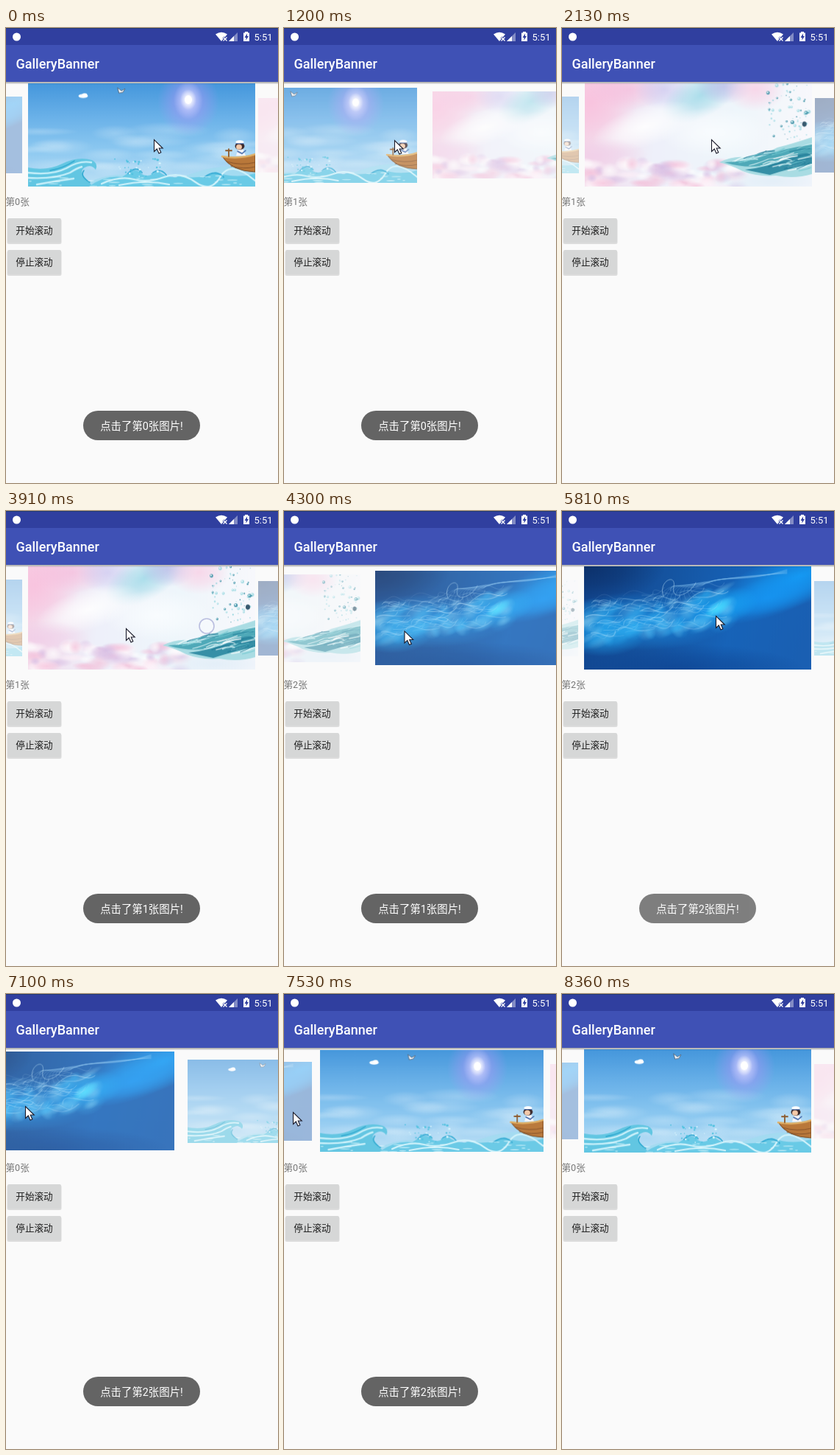
An HTML page with a canvas that plays this animation: 370x617 px, repeating every 8.46 s.

```html
<!DOCTYPE html>
<html lang="zh-CN">
<head>
<meta charset="utf-8">
<title>GalleryBanner</title>
<style>
html, body { margin: 0; width: 370px; height: 617px; overflow: hidden; background: #fafafa; }
canvas, svg { position: absolute; left: 0; top: 0; display: block; }
text { font-family: Roboto, "Noto Sans CJK SC", "Noto Sans CJK", sans-serif; }
</style>
</head>
<body>
<canvas id="stage" width="370" height="617"></canvas>
<svg width="370" height="617" viewBox="0 0 370 617">
  <defs>
    <linearGradient id="drop" x2="0" y2="1">
      <stop stop-color="#000" stop-opacity=".36"/><stop offset="1" stop-color="#000" stop-opacity="0"/>
    </linearGradient>
    <g id="btn">
      <rect x="1.5" y="1" width="74" height="34" rx="2.5" fill="#000" opacity=".12"/>
      <rect x="2" y="0" width="73" height="33" rx="2" fill="#d6d7d7"/>
    </g>
  </defs>
  <rect y="73" width="370" height="3.5" fill="url(#drop)"/>
  <rect width="370" height="23" fill="#303f9f"/>
  <rect width="370" height="1" fill="#233a70"/>
  <rect y="23" width="370" height="50" fill="#3f51b5"/>
  <circle cx="14.5" cy="12" r="5.5" fill="#fff"/>
  <g fill="#fff">
    <path d="M285 8.5Q293 3 301 8.5L293 18Z"/>
    <path d="M303 18L315 6V18Z" opacity=".4"/>
    <path d="M303 18L310 11V18Z"/>
    <path d="M325 6.5V5h4v1.500h2V18h-8V6.500Z"/>
  </g>
  <path d="M295.500 12.500l5 5m0-5l-5 5" stroke="#303f9f" stroke-width="3"/>
  <path d="M295.500 12.500l5 5m0-5l-5 5" stroke="#fff" stroke-width="1.300"/>
  <path d="M328 7.500l-3.500 5.500h2v3.500l3.500-5.500h-2Z" fill="#303f9f"/>
  <text x="362.500" y="17" font-size="13" text-anchor="end" fill="#fff">5:51</text>
  <text x="13.500" y="55" font-size="18" font-weight="500" fill="#fff">GalleryBanner</text>
  <text id="label" x="-.5" y="239.800" font-size="12.600" fill="#757575"></text>
  <use href="#btn" y="258"/>
  <use href="#btn" y="301"/>
  <g font-size="12.600" fill="#1c1c1c" text-anchor="middle">
    <text x="38.500" y="278.800">开始滚动</text>
    <text x="38.500" y="321.800">停止滚动</text>
  </g>
  <g id="toast">
    <rect x="105" y="519" width="159" height="40" rx="20" fill="#646464"/>
    <text id="msg" x="184.500" y="545" font-size="14.400" text-anchor="middle" fill="#fff"></text>
  </g>
  <circle id="ring" cx="273" cy="156" r="10" fill="#fff" fill-opacity=".25" stroke="#a3a6d4" stroke-opacity=".7" stroke-width="1.600"/>
  <path id="cursor" d="M.5 .5V16.500L4.300 13L7 19L9.800 17.800L7.200 12H12.200Z" fill="#fff" stroke="#1b1b2a" stroke-width="1.100"/>
</svg>
<script>
const W = 309, H = 140, LOOP = 8460;
const $ = id => document.getElementById(id);

function rng(seed) {
  return () => (seed = (seed * 16807) % 2147483647) / 2147483647;
}

function banner(paint) {
  const c = document.createElement('canvas');
  c.width = W; c.height = H;
  const g = c.getContext('2d');
  g.lineCap = 'round';
  paint(g);
  return c;
}

function fillLinear(g, x, y, ...colors) {
  const grad = g.createLinearGradient(0, 0, x, y);
  colors.forEach((c, i) => grad.addColorStop(i / (colors.length - 1), c));
  g.fillStyle = grad;
  g.fillRect(0, 0, W, H);
}

// soft elliptical spot; rgb is "r,g,b"
function glow(g, x, y, rx, ry, rgb, a = 1, turn = 0) {
  g.save();
  g.translate(x, y);
  g.rotate(turn);
  g.scale(rx, ry);
  const grad = g.createRadialGradient(0, 0, 0, 0, 0, 1);
  grad.addColorStop(0, `rgba(${rgb},${a})`);
  grad.addColorStop(.5, `rgba(${rgb},${a * .6})`);
  grad.addColorStop(1, `rgba(${rgb},0)`);
  g.fillStyle = grad;
  g.fillRect(-1, -1, 2, 2);
  g.restore();
}

function oval(g, x, y, rx, ry, color) {
  g.fillStyle = color;
  g.beginPath();
  g.ellipse(x, y, rx, ry, 0, 0, 7);
  g.fill();
}

function shape(g, d, fill, stroke, width = 1) {
  const p = new Path2D(d);
  if (fill) { g.fillStyle = fill; g.fill(p); }
  if (stroke) { g.strokeStyle = stroke; g.lineWidth = width; g.stroke(p); }
}

function sea(g) {
  const r = rng(11);
  fillLinear(g, 0, H, '#4597dc', '#6bb2e9', '#8fcaf1', '#c0e2f6');
  for (let i = 0; i < 26; i++)
    glow(g, r() * W, 62 + r() * 62, 25 + r() * 35, 5 + r() * 8, '225,242,252', .28);
  glow(g, 218, 25, 42, 46, '165,150,245', .75);
  glow(g, 218, 23, 20, 26, '205,215,255', .9);
  glow(g, 218, 22, 11, 14, '255,255,255');
  oval(g, 218, 22, 5, 6, '#fff');
  oval(g, 75, 17, 6.500, 2.800, '#f6fbff');
  oval(g, 77, 15.500, 3.500, 2.300, '#fff');
  shape(g, 'M122 6l5 4l5-3l-3 5l-5 1Z', '#eef4fa', '#56616f', .8);
  // far swell, curling wave, near water
  shape(g, 'M70 140Q110 118 150 126T230 120T309 118V140Z', '#a3dbf1');
  shape(g, 'M0 114Q26 119 46 109Q68 98 87 104Q96 108 92 117Q86 109 77 114Q69 119 78 128L88 140H0Z', '#62c6e2');
  shape(g, 'M0 121Q32 125 52 115Q70 104 86 107M0 128Q35 130 57 121Q66 115 73 113M12 137Q38 132 62 129', null, '#c8f0fa', 2.400);
  shape(g, 'M30 118Q48 115 63 105M76 118Q70 126 84 134', null, '#2ca7cf', 1.500);
  shape(g, 'M82 140Q105 124 128 127Q145 114 151 120Q163 131 176 118Q190 130 205 126Q235 131 255 120Q282 130 309 122V140Z', '#69cae6');
  shape(g, 'M100 136Q125 125 144 130T185 127T228 134T262 126T309 132M124 138Q160 130 192 137', null, '#d2f3fb', 2.200);
  shape(g, 'M136 122Q147 111 155 121M170 121Q180 114 188 124M240 127Q255 116 266 127', null, '#38acd5', 1.800);
  for (let i = 0; i < 34; i++) {
    const a = r() * 1.500 + .4;
    oval(g, 118 + r() * 70, 102 + r() * 24, a, a * .8, i % 3 ? '#52c2e0' : '#d9f6fd');
  }
  for (let i = 0; i < 30; i++) oval(g, r() * W, 125 + r() * 15, 2 + r() * 6, .8, 'rgba(225,248,253,.6)');
  // boat and sailor
  shape(g, 'M264 99Q288 103 309 96V120Q277 119 264 99Z', '#b9783a', '#744721');
  shape(g, 'M264 99Q288 103 309 96', null, '#e0b066', 2.500);
  shape(g, 'M270 106Q290 112 309 107M276 112Q293 117 309 113', null, '#87532a');
  shape(g, 'M273 99V89M269 91h8', null, '#8d5a2c', 1.800);
  shape(g, 'M283 98L286 88H292L296 98Z', '#f4f6fb');
  shape(g, 'M285 92L291 95L296 91', null, '#3b64a8', 1.500);
  oval(g, 288, 85, 6.500, 4.800, '#3c2a2c');
  oval(g, 287, 86, 4, 3.500, '#f4c9a8');
  oval(g, 288, 79.500, 5.500, 2.600, '#fff');
  shape(g, 'M283 81.500H293', null, '#3a5fa5', 1.200);
}

function splash(g) {
  const r = rng(23);
  fillLinear(g, W, 40, '#f6d3e6', '#eef0fa', '#eef6fb', '#f8f8fc');
  glow(g, 10, 25, 62, 55, '250,190,220', .75);
  glow(g, 60, 8, 55, 28, '246,188,220', .7);
  glow(g, 108, 8, 40, 28, '205,200,240', .7);
  glow(g, 158, 16, 58, 30, '150,215,230', .75, -.5);
  glow(g, 190, 4, 38, 24, '190,185,232', .7);
  glow(g, 232, 8, 42, 30, '250,205,228', .75);
  glow(g, 82, 58, 75, 28, '255,255,255', .9, -.3);
  glow(g, 175, 66, 75, 34, '250,253,255', .9);
  glow(g, 15, 98, 70, 25, '240,205,232', .7);
  for (let i = 0; i < 75; i++) {
    const x = r() * 210, y = 107 + r() * 36;
    glow(g, x, y, 7 + r() * 15, 4 + r() * 7,
      ['255,255,255', '244,190,216', '216,190,228', '255,240,248'][i % 4], .7);
  }
  glow(g, 255, 132, 90, 20, '226,238,248', .9);
  // rising water
  shape(g, 'M183 107Q205 97 222 101Q246 96 262 87Q282 82 309 73V123Q286 130 260 125Q236 127 215 119Q200 111 183 107Z', '#a9dce3');
  shape(g, 'M190 107Q224 106 248 97T309 83V94Q270 99 240 112Q216 115 190 107Z', '#4fa9b8');
  shape(g, 'M218 117Q252 113 278 101T309 99V109Q276 116 252 124Z', '#368fa6');
  g.globalAlpha = .75;
  for (let i = 0; i < 44; i++) {
    const x = 200 + r() * 95, k = (x - 190) / 110;
    const y = 107 + (r() - .5) * 38 * k - k * 5;
    shape(g, `M${x} ${y}q${6 + r() * 8} ${-7 * r()} ${14 + r() * 14} ${-2 - r() * 8}`,
      null, ['#ebfcfd', '#237f99', '#74c9d2', '#fff'][i % 4], .6 + r() * 1.500);
  }
  g.globalAlpha = .85;
  for (let i = 0; i < 72; i++) {
    const x = 249 + r() * 56, y = r() * 77, s = .5 + r() * r() * 3.200;
    oval(g, x, y, s, s, i % 3 ? 'rgba(122,204,215,.7)' : '#398fa4');
    if (s > 1.300) oval(g, x - s * .25, y - s * .25, s * .45, s * .45, '#effcfd');
  }
  g.globalAlpha = 1;
  oval(g, 299, 55, 3, 3.500, '#37596e');
}

function smoke(g) {
  const r = rng(41);
  fillLinear(g, W, 90, '#11458e', '#15539f', '#1763b8', '#1a5fb2');
  glow(g, 0, 0, 110, 50, '12,44,98', .8);
  glow(g, 130, 140, 170, 35, '14,65,142', .7);
  glow(g, 292, 14, 120, 38, '20,160,250', .9, -.35);
  glow(g, 250, 42, 85, 27, '22,150,244', .85, -.3);
  glow(g, 175, 58, 65, 27, '24,170,250', .9, -.25);
  glow(g, 80, 74, 115, 40, '28,140,224', .85);
  glow(g, 25, 92, 60, 30, '32,164,238', .8);
  for (let i = 0; i < 75; i++) {
    const x = r() * 195, y = 80 - x * .13 + (r() - .5) * 48;
    glow(g, x, y, 8 + r() * 17, 5 + r() * 9, i % 3 ? '50,180,245' : '135,210,245', .25 + r() * .2, -.5);
  }
  glow(g, 182, 57, 22, 9, '70,220,255', .9, -.6);
  for (let i = 0; i < 85; i++) {
    const x = r() * 155, y = 72 - x * .12 + (r() - .5) * 54;
    shape(g, `M${x} ${y}c${r() * 20} ${-20 * r()} ${20 + r() * 12} ${16 * r()} ${25 + r() * 25} ${-12 + r() * 14}`,
      null, `rgba(190,230,252,${.12 + r() * .3})`, .5 + r() * .9);
  }
  for (let i = 0; i < 9; i++) {
    const k = i * 1.800;
    shape(g, `M${95 + k * 4} ${55 - k}C${115 + k} ${8 + k} ${140 + k * 2} ${35 - k} ${165 + k} ${23 - k * .3}S${215 + k * 2} ${24 - k} ${276} ${4 + k * .4}`,
      null, 'rgba(150,208,248,.25)', .8);
  }
  shape(g, 'M108 40C100 20 126 8 122 28S145 38 152 22M140 48C168 18 180 46 196 34', null, 'rgba(190,228,250,.5)', 1);
}

const pics = [sea, splash, smoke].map(banner);

// [first, last, count] of the moments when the picture changes
const runs = [[130, 1050, 8], [1200, 2130, 8], [2250, 2850, 5], [3220, 4180, 8],
  [4300, 5260, 8], [5380, 6380, 8], [6530, 7530, 8], [7680, 8360, 6]];
const ticks = [0];
for (const [a, b, n] of runs)
  for (let i = 0; i < n; i++) ticks.push(Math.floor((a + (b - a) * i / (n - 1)) / 10) * 10);

const scroll = [[0, 0], [920, 0], [1050, .12], [1200, .45], [1330, .7], [1600, .93], [1860, .98],
  [2130, .997], [2250, 1], [3910, 1], [4040, 1.2], [4180, 1.5], [4300, 1.7], [4440, 1.85],
  [4710, 1.946], [4980, 1.985], [5400, 2], [6670, 2], [6950, 2.1], [7100, 2.307], [7240, 2.63],
  [7380, 2.84], [7530, 2.94], [7680, 2.98], [7950, 3]];
const pointer = [[0, 201, 151], [390, 201, 151], [660, 262, 152], [920, 262, 152], [1200, 150, 152],
  [1460, 150, 152], [2130, 203, 151], [3220, 203, 151], [3490, 268, 152], [3760, 268, 154],
  [3900, 163, 159], [4710, 164, 166], [5260, 180, 156], [5660, 209, 142], [5950, 209, 142],
  [6380, 258, 150], [6810, 258, 152], [7100, 26, 152], [7530, 12, 160], [7950, 22, 390], [8220, 18, 562]];
const toast = [[0, 1], [1330, 1], [1600, 0], [2250, 0], [2550, 1], [4570, 1], [4710, .65],
  [4980, 0], [5660, 0], [5800, .82], [5940, 1], [7950, 1], [8220, 0]];

function at(table, t, col = 1) {
  const i = table.findIndex(k => k[0] > t);
  if (i < 0) return table[table.length - 1][col];
  const a = table[i - 1], b = table[i];
  return a[col] + (b[col] - a[col]) * (t - a[0]) / (b[0] - a[0]);
}

const ctx = $('stage').getContext('2d');

function page(i, pos) {
  const q = i - pos, d = Math.min(Math.abs(q), 1);
  const s = q < 0 ? 1 - .257 * d ** 1.500 : 1 - .28 * d;
  const w = W * s, h = H * s;
  const x = q < 0 ? 339 + 317 * q - 60 * d * (1 - d) - w : 30 + 313 * q;
  ctx.globalAlpha = 1 - .62 * d ** 1.300;
  ctx.drawImage(pics[(i + 3) % 3], x, 145.200 - h / 2, w, h);
}

function draw(t) {
  const pos = at(scroll, t), mid = Math.floor(pos);
  ctx.clearRect(0, 0, 370, 617);
  for (let i = mid - 1; i <= mid + 2; i++) page(i, pos);
  const sel = t < 1200 || t >= 7100 ? 0 : t < 4180 ? 1 : 2;
  const hit = t < 2250 ? 0 : t < 5300 ? 1 : 2;
  $('label').textContent = `第${sel}张`;
  $('msg').textContent = `点击了第${hit}张图片!`;
  $('toast').setAttribute('opacity', at(toast, t));
  $('ring').setAttribute('visibility', t >= 3900 && t < 4030 ? 'visible' : 'hidden');
  $('cursor').setAttribute('visibility', t < 8300 ? 'visible' : 'hidden');
  $('cursor').setAttribute('transform', `translate(${at(pointer, t, 1)} ${at(pointer, t, 2)})`);
}

let shown = -1;
const start = performance.now();
function frame() {
  const t = (performance.now() - start) % LOOP;
  const tick = ticks.filter(k => k <= t).pop();
  if (tick !== shown) draw(shown = tick);
  requestAnimationFrame(frame);
}
frame();
</script>
</body>
</html>
```
